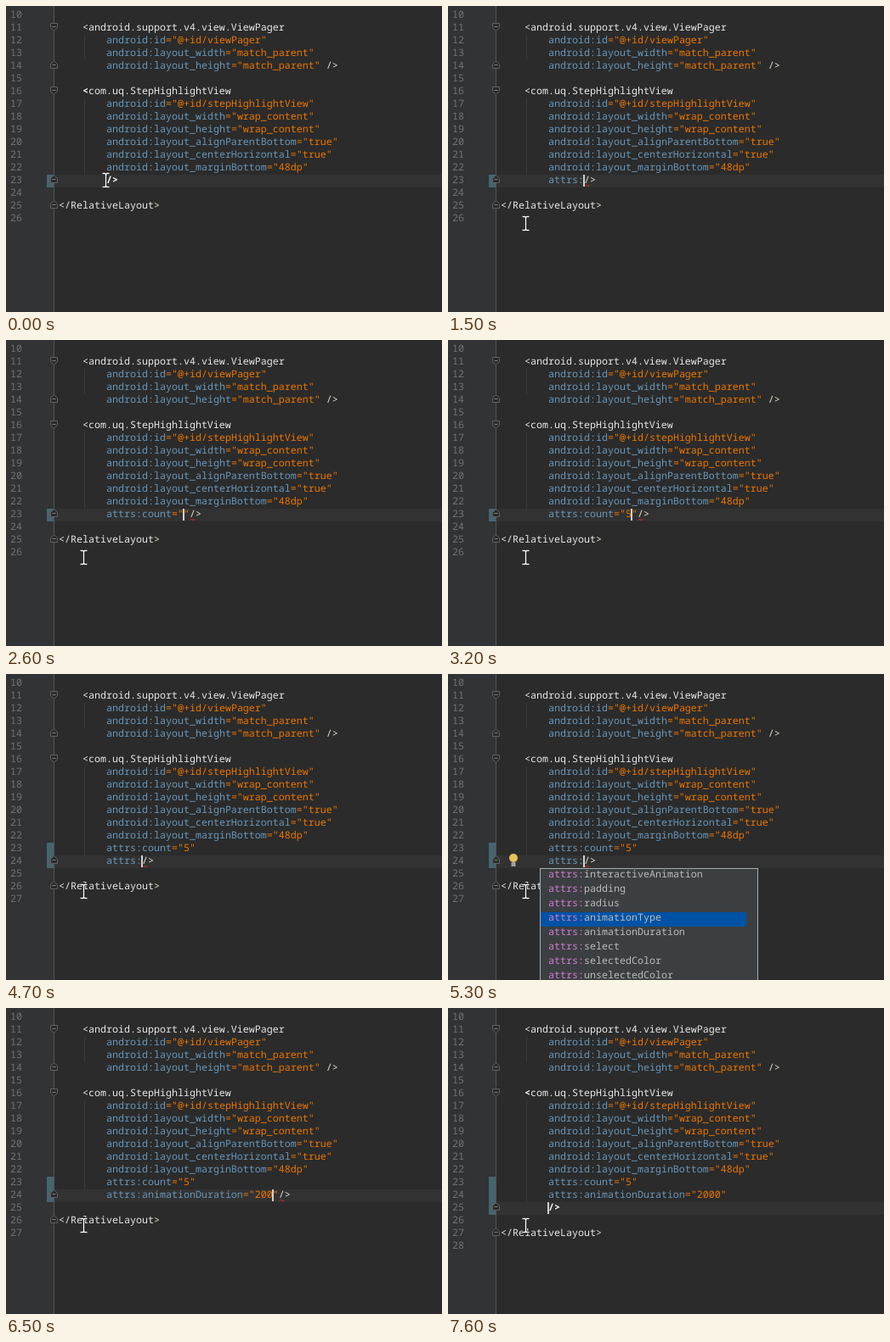
These frames come from a looping animation (513x361 px, 8 s). An HTML page:

```html
<!DOCTYPE html>
<html lang="en">
<head>
<meta charset="utf-8">
<title>Editor</title>
<style>
html, body { margin: 0; width: 100%; height: 100%; overflow: hidden; background: #2b2b2b; }
svg { display: block; }
text { font: 11.667px "Noto Sans Mono", "DejaVu Sans Mono", monospace; text-rendering: geometricPrecision; white-space: pre; }
.hint { font: 9.35px "Open Sans", "Noto Sans", sans-serif; }
</style>
</head>
<body>
<svg id="stage" width="513" height="361" viewBox="0 0 513 361"></svg>
<script>
const stage = document.getElementById('stage');
const LOOP = 8000, CHAR = 7, ROW = 15, LEFT = 62, INDENT = 118;
const COLOR = { tag: '#e8e8e8', end: '#e6e2cf', value: '#ec7600', attr: '#6897bb', match: '#d17ad6', item: '#bbbbbb' };

// Lines 10 to 22 never change.
const HEAD = `
    <android.support.v4.view.ViewPager
        android:id="@+id/viewPager"
        android:layout_width="match_parent"
        android:layout_height="match_parent" />

    <com.uq.StepHighlightView
        android:id="@+id/stepHighlightView"
        android:layout_width="wrap_content"
        android:layout_height="wrap_content"
        android:layout_alignParentBottom="true"
        android:layout_centerHorizontal="true"
        android:layout_marginBottom="48dp"`.split('\n');

const ATTRS = ['interactiveAnimation', 'padding', 'radius', 'animationType', 'animationDuration',
  'select', 'selectedColor', 'unselectedColor', 'viewPager'];
const COLORS = ['count', 'selectedColor', 'unselectedColor'];
const COUNT = 'attrs:count="5"\n', DURATION = COUNT + 'attrs:animationDuration=';

// Each step overrides part of the editor state; "|" marks the caret.
const STEPS = [
  [0, { code: '|/>', strong: 'tag', caret: 1, list: null, sel: 0, query: '' }],
  [700, { caret: 0 }],
  [800, { bulb: 1 }],
  [1200, { code: 'attrs:|/>', strong: '', caret: 1, bulb: 0 }],
  [1500, { error: 1 }],
  [1700, { list: ['count', ...ATTRS] }],
  [2000, { code: 'attrs:c|/>', list: COLORS, query: 'c' }],
  [2300, { code: 'attrs:co|/>', query: 'co' }],
  [2600, { code: 'attrs:count="|"/>', list: null, query: '' }],
  [2700, { values: 1 }],
  [3200, { code: 'attrs:count="5|"/>', values: 0 }],
  [3500, { error: 0 }],
  [3700, { code: 'attrs:count="5"|/>', strong: 'quote' }],
  [4000, { code: COUNT + '|/>', strong: 'tag' }],
  [4400, { code: COUNT + 'attrs:|/>', strong: '' }],
  [4700, { error: 1 }],
  [4900, { list: ATTRS }],
  [5100, { sel: 1, bulb: 1 }],
  [5200, { sel: 2 }],
  [5300, { sel: 3 }],
  [5400, { sel: 4, bulb: 0 }],
  [5700, { code: DURATION + '"|"/>', list: null, values: 1 }],
  [6200, { code: DURATION + '"2|"/>', values: 0 }],
  [6400, { code: DURATION + '"20|"/>' }],
  [6500, { code: DURATION + '"200|"/>' }],
  [6700, { code: DURATION + '"2000|"/>' }],
  [7000, { error: 0 }],
  [7300, { code: DURATION + '"2000"|/>', strong: 'quote' }],
  [7600, { code: DURATION + '"2000"\n|/>', strong: 'tag' }]
];

const NONE = /($^)/, STRONG = { tag: /(^<|^\/>)/, quote: /(")/ };
const rowTop = n => 4 + (n - 10) * ROW;
const esc = s => s.replace(/&/g, '&amp;').replace(/</g, '&lt;');
const rect = (x, y, w, h, fill, more = '') => `<rect x="${x}" y="${y}" width="${w}" height="${h}" fill="${fill}" ${more}/>`;
const path = (d, stroke, width = 1, fill = 'none') => `<path d="${d}" stroke="${stroke}" stroke-width="${width}" fill="${fill}"/>`;
const span = (s, fill, weight = 400) => `<tspan fill="${fill}" font-weight="${weight}">${esc(s)}</tspan>`;
const text = (x, y, body, more = '') => `<text x="${x}" y="${y}" ${more}>${body}</text>`;

function codeLine(n, line, strong = NONE) {
  const code = line.trimStart();
  const body = code.replace(/(<\/?[\w.]+)|(\/?>)|(="[^"]*")|[\w:]+|\s+/g, (s, tag, end, value) => {
    const fill = tag ? COLOR.tag : end ? COLOR.end : value ? COLOR.value : COLOR.attr;
    return s.split(strong).map((p, i) => p && span(p, i % 2 && !value ? '#fff' : fill, i % 2 ? 700 : 400)).join('');
  });
  return text(LEFT + (line.length - code.length) * CHAR, rowTop(n) + 10, body);
}

function fold(n, up) {
  const y = rowTop(n) + .5;
  const shape = up ? `M52.5 ${y + 9}h8v-5l-4 -4l-4 4z` : `M52.5 ${y + 1}h8v5l-4 4l-4 -4z`;
  return path(shape, '#606060', 1, '#2b2b2b') + path(`M54.5 ${y + 5}h4`, '#808080');
}

const guide = (from, to) => rect(92, rowTop(from), 1, rowTop(to) - rowTop(from), '#393939');
const panel = (x, y, w, h) => rect(x + .5, y + .5, w - 1, h - 1, '#3c3f41', 'stroke="#a5abaf"');

function attrList(y, { list, sel, query }) {
  const x = INDENT - 10;
  let out = panel(x, y, 257, list.length * 17 + 17) + rect(x + 1, y + 1 + sel * 17, 242, 17, '#0052a4');
  const hump = query && new RegExp(`(^${query}|${query[0].toUpperCase() + query.slice(1)})`);
  list.forEach((name, i) => {
    const parts = name.split(hump || NONE).map((p, k) => span(p, k % 2 ? COLOR.match : COLOR.item));
    out += text(INDENT, y + 11 + i * 17, span('attrs:', COLOR.match) + parts.join(''));
  });
  const base = y + list.length * 17 + 12;
  return out + text(x + 2.5, base, 'Press Ctrl+Space to view tags from other namespaces', 'class="hint" fill="#bbb"')
    + text(x + 246, base, 'π', 'fill="#3c9bd6" style="font-size:13px"');
}

const valueList = (x, y) => panel(x, y, 132, 19) + rect(x + 1, y + 1, 130, 17, '#4b4f51')
  + text(x + 10, y + 11, span('@android:', '#8f8f8f'));

const bulb = y => `<circle cx="77" cy="${y + 5}" r="5" fill="#e8c25a"/>` + rect(74.5, y + 10, 5, 5, '#a0a0a0');

function pointer(x, y) {
  const d = `M${x - 4} ${y - 8}h3l1 1l1 -1h3M${x} ${y - 7}v14M${x - 4} ${y + 8}h3l1 -1l1 1h3`;
  return path(d, '#111', 3) + path(d, '#fff', 1.4);
}

function render(t) {
  const s = Object.assign({}, ...STEPS.filter(([at]) => at <= t).map(([, change]) => change));
  const rows = s.code.split('\n'), last = 22 + rows.length, y = rowTop(last);
  const caretX = INDENT + rows.at(-1).indexOf('|') * CHAR;
  const current = rows.at(-1).replace('|', '');
  const strong = STRONG[s.strong];

  let out = rect(0, 0, 513, 361, '#2b2b2b') + rect(0, 0, 56, 361, '#313335')
    + rect(57, y, 456, ROW, '#323232')
    + guide(12, 14) + guide(17, last)
    + rect(48, rowTop(23), 8, rows.length * ROW, '#45656f')
    + rect(56, 0, 1, 361, '#555');
  out += fold(11) + fold(14, true) + fold(16) + fold(last, true) + fold(last + 2, true);
  for (let n = 10; n <= last + 3; n++) out += text(5, rowTop(n) + 10, n, 'fill="#707376"');

  HEAD.forEach((line, i) => out += codeLine(10 + i, line, i === 6 && s.strong === 'tag' ? strong : NONE));
  rows.slice(0, -1).forEach((line, i) => out += codeLine(23 + i, ' '.repeat(8) + line));
  out += codeLine(last, ' '.repeat(8) + current, strong) + codeLine(last + 2, '</RelativeLayout>');

  if (s.error) {
    const x = INDENT + current.indexOf('/>') * CHAR;
    out += path(`M${x + .5} ${y + 14}l2 -2l2 2l2 -2`, '#d92b2b');
  }
  if (s.caret) out += rect(caretX - 1, y, 2, 14, '#d0d0d0');
  if (s.bulb) out += bulb(y - 2);
  if (s.list) out += attrList(y + ROW, s);
  if (s.values) out += valueList(caretX - 10, y + ROW);

  const k = Math.min(1, Math.floor(t / 100) / 4), e = k * k * (3 - 2 * k);
  stage.innerHTML = out + pointer(Math.round(117 - 26 * e) + .5, Math.round(205 + 51 * e) + .5);
}

let shown = -1;
const start = performance.now();
function tick() {
  const t = Math.floor((performance.now() - start) % LOOP / 100) * 100;
  if (t !== shown) render(shown = t);
  requestAnimationFrame(tick);
}
tick();
</script>
</body>
</html>
```
